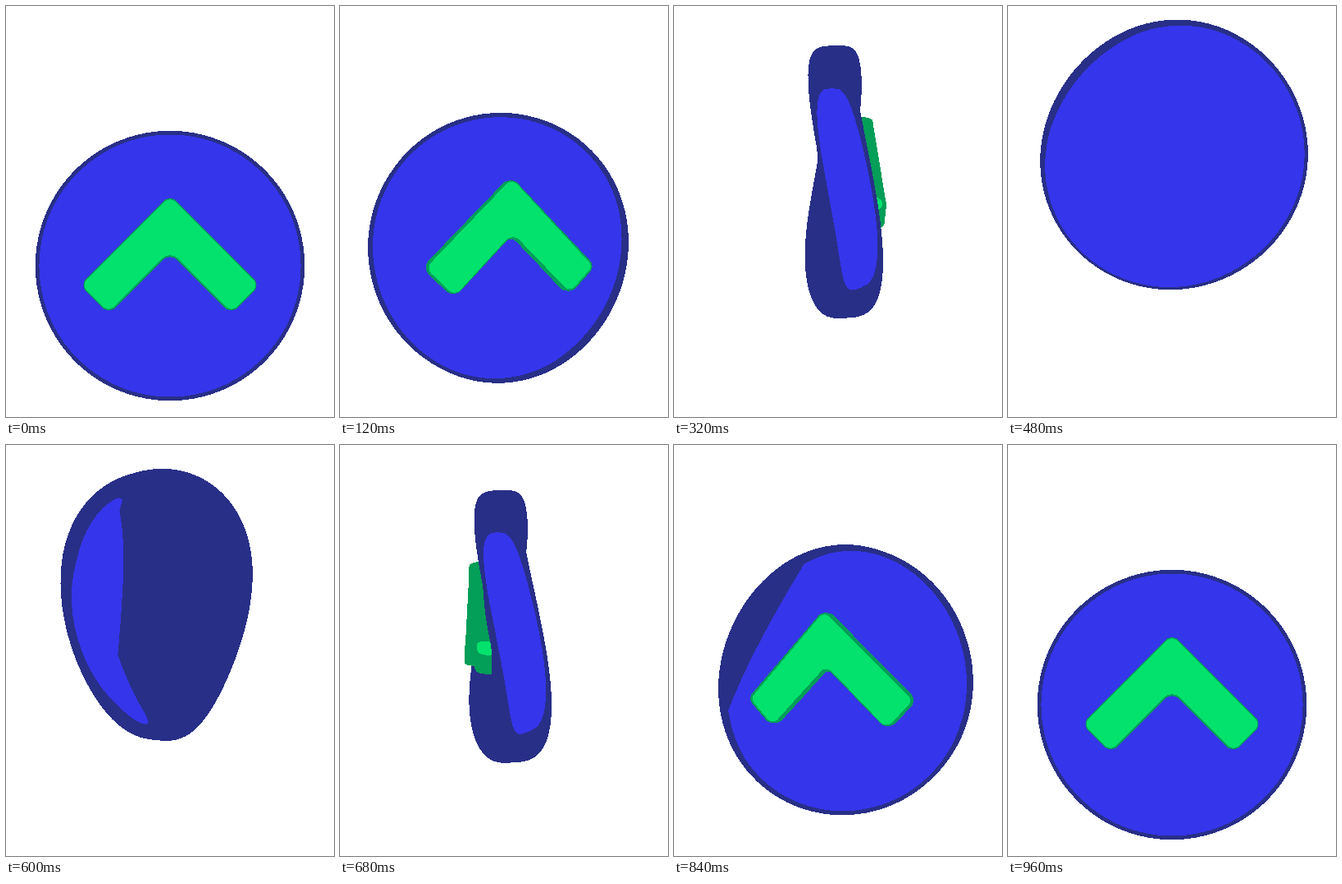
An HTML page with a canvas that plays this animation: 400x500 px, repeating every 1320 ms.

```html
<!DOCTYPE html>
<html lang="en">
<head>
<meta charset="utf-8">
<title>Coin flip</title>
<style>
  html, body { margin: 0; width: 100%; height: 100%; overflow: hidden; background: #fff; }
  canvas { display: block; width: 400px; height: 500px; }
</style>
</head>
<body>
<canvas id="stage" width="400" height="500"></canvas>
<script>
const W = 400, H = 500, LOOP = 1320, STEP = 40, END = 960;
const CAMERA = 750;            // eye distance
const FACE = 144, EDGE = 18;   // flat radius, rounded rim width
const HALF = 25;               // half the coin's thickness
const RAD = Math.PI / 180;
const DOME = 19 * RAD;
const LIT = Math.cos(39.5 * RAD);
const LAMP = 1500;             // distance of the lamp, level with the resting coin
const LAG = .15;               // ms of twist per pixel of height

const turnKeys = [[0, 0], [200, 39], [320, 94], [480, 173], [600, 233], [760, 310], [960, 360]];
const riseKeys = [[0, 316], [200, 268.5], [320, 214], [480, 181], [600, 194], [760, 254.5], [960, 316]];

const ctx = document.getElementById('stage').getContext('2d');
const image = ctx.createImageData(W, H);
const pixels = new Uint32Array(image.data.buffer);
const depth = new Float32Array(W * H);

const rgb = (r, g, b) => (255 << 24 | b << 16 | g << 8 | r) >>> 0;
const WHITE = rgb(255, 255, 255);

// Monotone cubic through the keys, flat at both ends
function curve(keys) {
  const sec = i => (keys[i + 1][1] - keys[i][1]) / (keys[i + 1][0] - keys[i][0]);
  const slope = keys.map((k, i) => {
    if (!i || i === keys.length - 1) return 0;
    const a = sec(i - 1), b = sec(i);
    return a * b <= 0 ? 0 : 2 * a * b / (a + b);
  });
  return t => {
    t = Math.max(0, Math.min(END, t));
    let i = 0;
    while (i < keys.length - 2 && t > keys[i + 1][0]) i++;
    const [t0, a] = keys[i], [t1, b] = keys[i + 1];
    const d = t1 - t0, u = (t - t0) / d, s = u * u * (3 - 2 * u);
    return a + (b - a) * s + d * (slope[i] * u * (1 - u) * (1 - u) - slope[i + 1] * u * u * (1 - u));
  };
}
const turn = curve(turnKeys), rise = curve(riseKeys);

// Normal of the slightly domed face, bent towards (ox, oy) by angle bend
function vertex(x, y, z, ox, oy, bend, side) {
  const r = Math.hypot(x, y) || 1e-6;
  const tilt = DOME * Math.min(1, r / FACE);
  const c = Math.cos(bend), s = Math.sin(bend);
  const nx = Math.sin(tilt) * x / r * c + ox * s;
  const ny = Math.sin(tilt) * y / r * c + oy * s;
  const nz = Math.cos(tilt) * c * side;
  const n = Math.hypot(nx, ny, nz);
  return { x, y, z, nx: nx / n, ny: ny / n, nz: nz / n };
}

// Square-ish quarter round: how far out and how far up
const soft = v => Math.pow(Math.max(0, v), .6);
const BENDS = Array.from({ length: 13 }, (_, i) => i / 12 * Math.PI / 2);

function coinRows() {
  const ring = (r, z, bend, side) => Array.from({ length: 90 }, (_, i) => {
    const a = i / 90 * 2 * Math.PI, c = Math.cos(a), s = Math.sin(a);
    return vertex(r * c, r * s, z * side, c, s, bend, side);
  });
  const half = side => [
    ...Array.from({ length: 14 }, (_, i) => ring(FACE * i / 14, HALF, 0, side)),
    ...BENDS.map(b => ring(FACE + EDGE * soft(Math.sin(b)), HALF * soft(Math.cos(b)), b, side))
  ];
  return [...half(1), ...half(-1).reverse()];
}

function chevronRows() {
  const k = 1 / 1.05, radius = 11, bevel = 8, base = 22.5, tall = 20;
  const corners = [[0, -87.5], [111, 23.5], [75, 59.5], [0, -15.5], [-75, 59.5], [-111, 23.5]]
    .map(p => [p[0] * k, p[1] * k]);
  const toward = (p, q) => {
    const d = Math.hypot(q[0] - p[0], q[1] - p[1]);
    return [(q[0] - p[0]) / d, (q[1] - p[1]) / d];
  };
  const outline = corners.flatMap((p, i) => {
    const a = toward(p, corners[(i + 5) % 6]), b = toward(p, corners[(i + 1) % 6]);
    const sign = i === 3 ? -1 : 1;
    return Array.from({ length: 9 }, (_, j) => {
      const t = j / 8 * Math.PI / 2, c = Math.cos(t), s = Math.sin(t);
      const dx = -(b[0] * c + a[0] * s), dy = -(b[1] * c + a[1] * s);
      return {
        x: p[0] + (a[0] + b[0] + dx) * radius,
        y: p[1] + (a[1] + b[1] + dy) * radius,
        ox: dx * sign, oy: dy * sign
      };
    });
  });
  const mid = -49 * k;
  const cap = f => outline.map(o => vertex(
    (o.x - o.ox * bevel) * f,
    mid + (o.y - o.oy * bevel - mid) * f,
    base + tall, 0, 0, 0, 1));
  const wall = b => outline.map(o => {
    const inset = bevel * (1 - soft(Math.sin(b)));
    return vertex(o.x - o.ox * inset, o.y - o.oy * inset,
      base + tall * soft(Math.cos(b)), o.ox, o.oy, b, 1);
  });
  return [...Array.from({ length: 8 }, (_, i) => cap(i / 8)), ...BENDS.map(wall)];
}

const meshes = [
  { rows: coinRows(), lit: rgb(53, 53, 235), dark: rgb(40, 47, 135) },
  { rows: chevronRows(), lit: rgb(2, 226, 108), dark: rgb(3, 158, 88) }
];

function triangle(a, b, c, mesh) {
  const area = (b.sx - a.sx) * (c.sy - a.sy) - (c.sx - a.sx) * (b.sy - a.sy);
  if (Math.abs(area) < 1e-6) return;
  const x0 = Math.max(0, Math.ceil(Math.min(a.sx, b.sx, c.sx) - .5));
  const x1 = Math.min(W - 1, Math.floor(Math.max(a.sx, b.sx, c.sx) - .5));
  const y0 = Math.max(0, Math.ceil(Math.min(a.sy, b.sy, c.sy) - .5));
  const y1 = Math.min(H - 1, Math.floor(Math.max(a.sy, b.sy, c.sy) - .5));
  for (let y = y0; y <= y1; y++) {
    for (let x = x0; x <= x1; x++) {
      const px = x + .5, py = y + .5;
      const u = ((px - a.sx) * (c.sy - a.sy) - (c.sx - a.sx) * (py - a.sy)) / area;
      const v = ((b.sx - a.sx) * (py - a.sy) - (px - a.sx) * (b.sy - a.sy)) / area;
      const w = 1 - u - v;
      if (u < -1e-6 || v < -1e-6 || w < -1e-6) continue;
      const near = w * a.near + u * b.near + v * c.near, i = y * W + x;
      if (near <= depth[i]) continue;
      depth[i] = near;
      pixels[i] = w * a.glow + u * b.glow + v * c.glow > LIT ? mesh.lit : mesh.dark;
    }
  }
}

function draw(t) {
  pixels.fill(WHITE);
  depth.fill(0);
  const cy = rise(t), angle = turn(t) * RAD;
  const speed = t > 0 && t < END ? (turn(t + 2) - turn(t - 2)) / 4 : 0;
  const twist = speed * LAG * RAD;
  const lamp = Math.atan2(316 - cy, LAMP), lampY = Math.sin(lamp), lampZ = Math.cos(lamp);
  for (const mesh of meshes) {
    for (const row of mesh.rows) for (const p of row) {
      const phi = angle + twist * p.y, c = Math.cos(phi), s = Math.sin(phi);
      const x = p.x * c + p.z * s, z = p.z * c - p.x * s;
      p.near = CAMERA / (CAMERA - z);
      p.sx = 200 + x * p.near;
      p.sy = cy + p.y * p.near;
      // the twist also leans the normals up or down
      const nx = p.nx * c + p.nz * s, nz = p.nz * c - p.nx * s;
      const ny = p.ny - twist * (nx * z - nz * x);
      p.glow = (ny * lampY + nz * lampZ) / Math.hypot(nx, ny, nz);
    }
    for (let i = 1; i < mesh.rows.length; i++) {
      const r = mesh.rows[i - 1], q = mesh.rows[i];
      for (let j = 0; j < r.length; j++) {
        const k = (j + 1) % r.length;
        triangle(r[j], q[j], q[k], mesh);
        triangle(r[j], q[k], r[k], mesh);
      }
    }
  }
  ctx.putImageData(image, 0, 0);
}

const start = performance.now();
let shown = 0;
function tick() {
  const t = (performance.now() - start) % LOOP;
  const now = Math.min(END, Math.floor(t / STEP) * STEP);
  if (now !== shown) draw(shown = now);
  requestAnimationFrame(tick);
}
draw(0);
requestAnimationFrame(tick);
</script>
</body>
</html>
```
